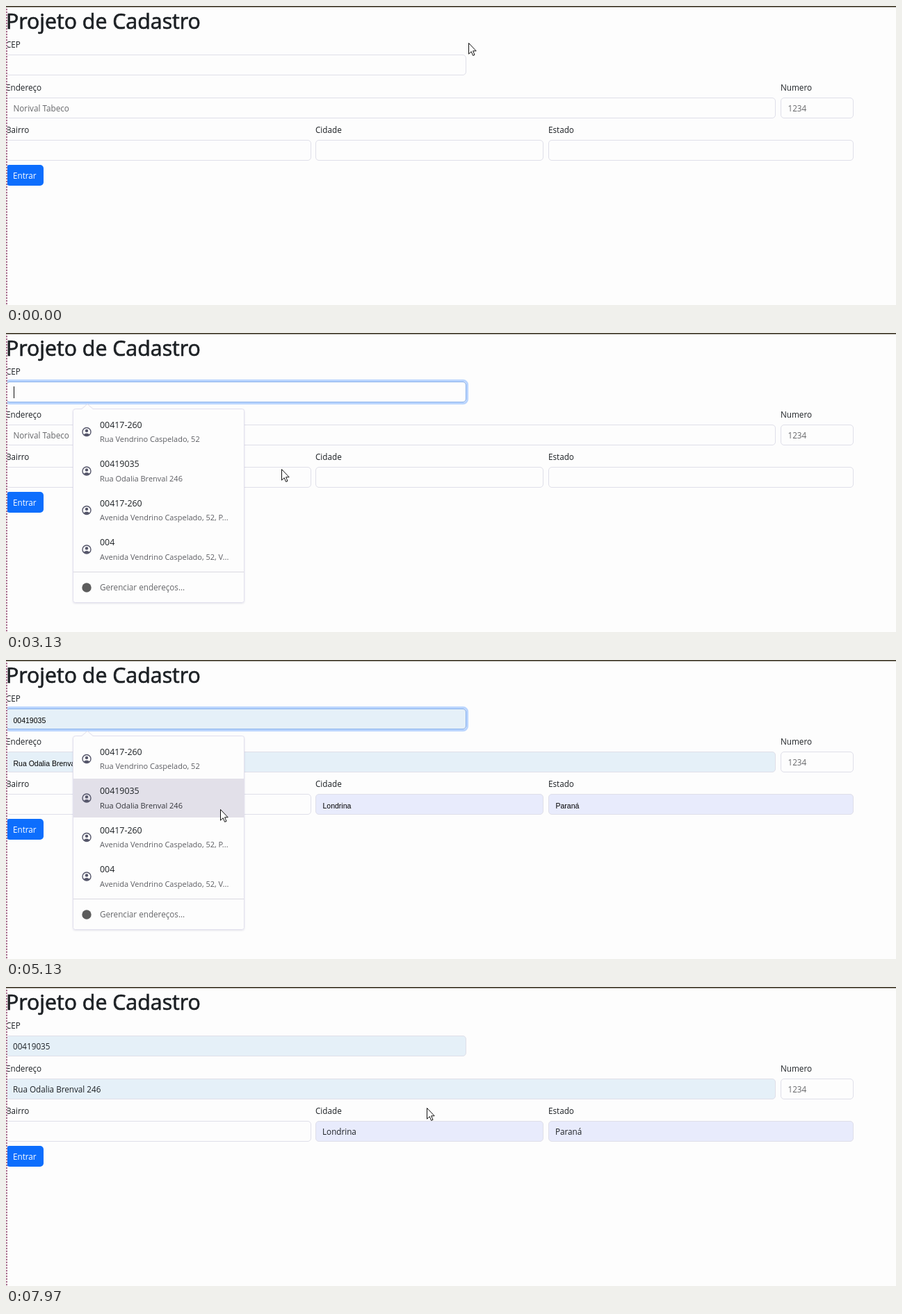
Recreate the animation shown at these times as an HTML page. Size 1280 px wide and 431 px high, loop 8 s.

```html
<!DOCTYPE html>
<html lang="pt-BR">
<head>
<meta charset="utf-8">
<title>Projeto de Cadastro</title>
<style>
  html, body { margin: 0; width: 100%; height: 100%; overflow: hidden; background: #fdfdfd; }
  svg { display: block; width: 100%; height: 100%; }
  text { font: 11.7px "Open Sans", "Noto Sans", sans-serif; fill: #1d2125; white-space: pre; }
  .title { font-size: 30.3px; stroke: #1d2125; stroke-width: .7px; }
  .hint { fill: #66676a; }
  .code { font-size: 12.4px; }
  .street { font-size: 11px; fill: #5c5d62; }
  .preview text { font: 10.5px "Liberation Sans", Arial, sans-serif; fill: #000; }
  .field { fill: #fdfdfd; stroke: #dfdfe9; }
</style>
</head>
<body>
<svg viewBox="0 0 1280 431" preserveAspectRatio="none">
  <defs>
    <pattern id="dots" width="2" height="4" patternUnits="userSpaceOnUse">
      <rect width="2" height="4" fill="#f3e8ec"/>
      <rect width="2" height="2" fill="#a8708f"/>
    </pattern>
    <filter id="shadow" x="-10%" y="-10%" width="120%" height="120%">
      <feDropShadow dx="0" dy="1" stdDeviation="1.2" flood-color="#504878" flood-opacity=".16"/>
    </filter>
  </defs>
  <rect width="1280" height="431" fill="#fdfdfd"/>
  <g id="form"></g>
  <g id="filled"></g>
  <g id="preview" class="preview"></g>
  <rect id="caret" x="11" y="77" width="1" height="17" fill="#111"/>
  <rect y="2" width="2" height="429" fill="url(#dots)"/>
  <rect width="1280" height="1.6" fill="#37301f"/>
  <g id="menu">
    <path d="M100.5 109.5H109L117 102.5L125 109.5H339.5Q342.5 109.5 342.5 112.5V385.5Q342.5 388.5 339.5 388.5H99.5Q96.5 388.5 96.5 385.5V112.5Q96.5 109.5 100.5 109.5Z"
      fill="#fdfdfd" stroke="#e2e0ee" filter="url(#shadow)"/>
    <rect id="hover" x="97" y="171" width="245.5" height="56" fill="#e2e0e9"/>
    <path d="M97 344.5H342" stroke="#d9d8e0"/>
    <g id="options"></g>
  </g>
  <path id="arrow" d="M.5 .5V16.2L4.2 12.7 6.6 18.4 9 17.4 6.6 11.8H11.2Z" fill="#fff" stroke="#111"/>
  <path id="beam" d="M-3 -7.5H-1Q0 -7.5 0 -6.5Q0 -7.5 1 -7.5H3M0 -6.5V6.5M-3 7.5H-1Q0 7.5 0 6.5Q0 7.5 1 7.5H3" fill="none" stroke="#222" stroke-width="1.2"/>
</svg>
<script>
const LOOP = 8000;
const FOCUS = 1880, MENU_OPEN = 2020, PICK = 5250, BLUR = 6600;
const CODE = "00419035", STREET = "Rua Odalia Brenval 246";

const FIELDS = {
  cep:    { label: "CEP",      x: 0,    y: 70,  right: 662 },
  street: { label: "Endereço", x: 0,    y: 132, right: 1107, hint: "Norival Tabeco" },
  number: { label: "Numero",   x: 1114, y: 132, right: 1219, hint: "1234" },
  area:   { label: "Bairro",   x: 0,    y: 193, right: 439 },
  city:   { label: "Cidade",   x: 445,  y: 193, right: 773 },
  state:  { label: "Estado",   x: 780,  y: 193, right: 1219 }
};
const VALUES = { cep: CODE, street: STREET, city: "Londrina", state: "Paraná" };
const OPTIONS = [
  ["00417-260", "Rua Vendrino Caspelado, 52"],
  [CODE, STREET],
  ["00417-260", "Avenida Vendrino Caspelado, 52, P..."],
  ["004", "Avenida Vendrino Caspelado, 52, V..."]
];
// Pointer path: time, x, y
const PATH = [
  [0, 665, 53], [500, 665, 53], [1450, 327, 78], [2250, 327, 78],
  [2950, 396, 196], [4120, 396, 196], [4450, 308, 215], [PICK, 308, 215],
  [5500, 307, 211], [6050, 307, 211], [6450, 305, 245], [7100, 305, 245],
  [7480, 440, 198], [7850, 605, 174], [LOOP, 605, 174]
];

const $ = id => document.getElementById(id);
const add = (id, markup) => $(id).insertAdjacentHTML("beforeend", markup);
const label = (x, y, text, cls = "") => `<text x="${x}" y="${y}" class="${cls}">${text}</text>`;
const box = (f, attrs = "") =>
  `<rect class="field" x="${f.x + .5}" y="${f.y + .5}" width="${f.right - f.x - 1}" height="29" rx="4.5" ${attrs}/>`;
const show = (id, on) => { $(id).style.display = on ? "" : "none"; };
const ease = p => p * p * (3 - 2 * p);
const ramp = (t, start, span) => ease(Math.min(1, Math.max(0, (t - start) / span)));

add("form", label(0, 33, "Projeto de Cadastro", "title"));
for (const [name, f] of Object.entries(FIELDS)) {
  add("form", label(f.x, f.y - 10.5, f.label) + box(f, `id="${name}"`));
  if (f.hint) add("form", label(f.x + 10.5, f.y + 20, f.hint, "hint").replace("<text", `<text id="${name}Hint"`));
}
add("form", `<rect id="ring" x="-1" y="68.5" width="664.5" height="33" rx="6" fill="none" stroke="#0d6efd" stroke-opacity=".28" stroke-width="3"/>
  <rect id="edge" x=".5" y="70.5" width="661" height="29" rx="4.5" fill="none" stroke="#86b0ec"/>
  <rect y="229" width="54" height="30" rx="5" fill="#0d6efd"/>
  <text x="10" y="249" style="fill:#fff">Entrar</text>`);

for (const [name, value] of Object.entries(VALUES)) {
  const { x, y } = FIELDS[name];
  add("filled", label(x + 10, y + 20, value));
  add("preview", label(x + 10.5, y + 20.5, value));
}

OPTIONS.forEach(([code, street], i) => {
  const y = 142.5 + i * 56.5;
  add("options", `<g transform="translate(116 ${y})">
      <circle r="6" fill="none" stroke="#55566a" stroke-width="1.4"/>
      <circle cy="-1.6" r="2.2" fill="#55566a"/>
      <path d="M-4.4 4Q0 -.2 4.4 4Q0 8 -4.4 4Z" fill="#55566a"/>
    </g>` + label(135, y - 6, code, "code") + label(135, y + 14.5, street, "street"));
});
add("options", `<circle cx="116" cy="367" r="6.7" fill="#5c5c5c"/>` + label(135, 371, "Gerenciar endereços...", "hint"));
const pickedStreet = document.querySelectorAll(".street")[1];

function pointerAt(t) {
  const i = PATH.findIndex(([time]) => time > t);
  const [t0, x0, y0] = PATH[i - 1], [t1, x1, y1] = PATH[i];
  const p = ramp(t, t0, t1 - t0);
  return [x0 + (x1 - x0) * p, y0 + (y1 - y0) * p];
}

function draw(t) {
  const [x, y] = pointerAt(t);
  const open = t >= MENU_OPEN && t < PICK;
  const hovering = open && x > 96 && x < 343 && y >= 171 && y < 227;
  const picked = t >= PICK;
  const hasValue = picked || hovering;

  show("menu", open);
  show("hover", hovering);
  pickedStreet.style.fill = hovering ? "#33343a" : "";
  show("filled", picked);
  show("preview", hovering);
  show("streetHint", !hasValue);
  for (const name in VALUES) {
    const tint = name === "cep" || name === "street" ? "#e5f0f8" : "#e8ebfc";
    $(name).style.fill = hasValue ? tint : "";
  }

  const focus = ramp(t, FOCUS, 150) - ramp(t, BLUR, 150);
  $("ring").style.opacity = $("edge").style.opacity = focus;
  const blinkOn = Math.floor((t - FOCUS) / 500) % 2 === 0;
  show("caret", t >= FOCUS && t < BLUR && blinkOn && !hovering);
  $("caret").setAttribute("x", picked ? 64 : 11);

  // The open menu keeps the plain arrow, even above a field
  const overField = !open && Object.values(FIELDS).some(f =>
    x >= f.x && x < f.right && y >= f.y && y < f.y + 30);
  show("beam", overField);
  show("arrow", !overField);
  $(overField ? "beam" : "arrow").setAttribute("transform", `translate(${Math.round(x)} ${Math.round(y)})`);
}

const start = performance.now();
function tick() {
  draw((performance.now() - start) % LOOP);
  requestAnimationFrame(tick);
}
tick();
</script>
</body>
</html>
```
